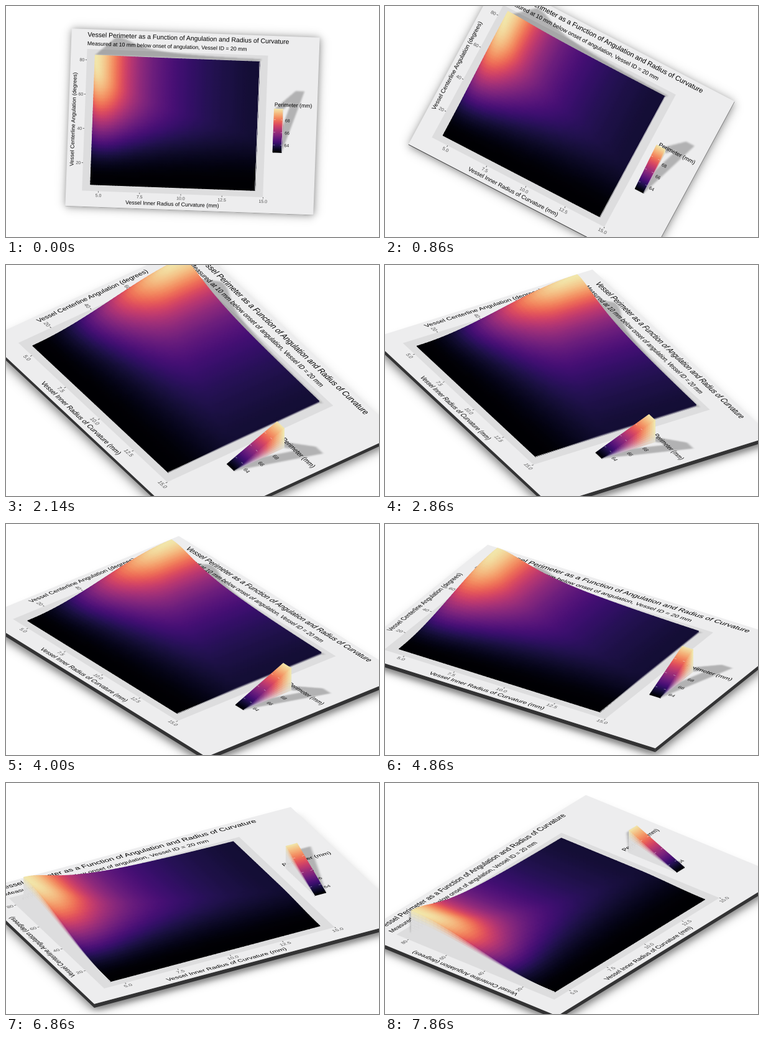
Recreate the animation shown at these times as a matplotlib script. Size 600 by 371 pixels, loop 8000 ms.

```python
import numpy as np
import matplotlib.pyplot as plt
from matplotlib.animation import FuncAnimation
from matplotlib.collections import LineCollection, PolyCollection
from matplotlib.colors import ListedColormap
from matplotlib.patches import PathPatch, Rectangle
from matplotlib.path import Path
from matplotlib.textpath import TextPath
from matplotlib.transforms import Affine2D

STAGE_W, STAGE_H = 600, 371
STEP_MS = 50
LOOP_MS = 8000
POSES_PER_SEC = 7

# Plate geometry, in pixels at the opening zoom
W, H = 399.3, 285.2
THICK = 5
FLOOR_Z = -10
MID_Z = 9
PEAK = 28.5
PANEL = (26, 32, 317.2, 259.8)
DATA = (39.2, 42.4, 304.2, 249.5)
BAR = (330.5, 118.3, 344.7, 187)
CAST = (33, -30)
PANEL_GREY = np.array([0.865, 0.865, 0.87])
PT = W / 7 / 72
CMAP = ListedColormap(0.96 * plt.get_cmap("magma")(np.linspace(0, 1, 256))[:, :3])

fig = plt.figure(figsize=(STAGE_W / 100, STAGE_H / 100), dpi=100, facecolor="white")
ax = fig.add_axes([0, 0, 1, 1])
ground = Affine2D()
floor = Affine2D()


# ---------- camera ----------
def sigmoid(x):
    return 1 / (1 + np.exp(-x))


def camera(pose):
    """Return the 2x3 projection matrix and theta for a pose."""
    n = 2 + pose * 30 / POSES_PER_SEC
    m = min(n, 359 - n)
    theta = np.radians(60 * np.sin(np.radians(n)))
    phi = np.radians(30 + 60 * sigmoid((7 - 27 * m / 179) / 2))
    zoom = 0.45 + 0.2 * sigmoid(5 - 25 * m / 179)
    s = 0.648 / zoom
    c, d = np.cos(theta), np.sin(theta)
    m3 = s * np.array([[c, -d, 0],
                       [d * np.sin(phi), c * np.sin(phi), -np.cos(phi)]])
    return m3, theta


def project(m3, u, v, z):
    u, v, z = np.broadcast_arrays(u, v, z)
    p = np.stack([u - W / 2, v - H / 2, z - MID_Z], axis=-1) @ m3.T
    return p + [STAGE_W / 2, STAGE_H / 2]


def plane_matrix(m3, z):
    off = project(m3, 0.0, 0.0, z)
    return np.array([[m3[0, 0], m3[0, 1], off[0]],
                     [m3[1, 0], m3[1, 1], off[1]],
                     [0, 0, 1]])


# ---------- data ----------
def perimeter(radius, angle):
    d = radius - 4.5
    width = 74 - 40 * np.sqrt(d / 10)
    t = np.clip((angle - 8) / width, 0, 1)
    rise = (t * t * (3 - 2 * t)) ** 1.1
    fall = (1 + (d / 1.75) ** 2) ** -0.65
    return rise * fall


def x_pos(radius):
    return DATA[0] + (radius - 4.5) * (DATA[2] - DATA[0]) / 10


def y_pos(angle):
    return DATA[3] - (angle - 7.5) * (DATA[3] - DATA[1]) / 75


def bar_pos(value):
    return BAR[3] - (value - 62.83) * 10


radius = 4.5 + 10 * np.linspace(0, 1, 52) ** 1.3
angle = np.linspace(82.5, 7.5, 40)
surf_h = perimeter(*np.meshgrid(radius, angle))
surf_u, surf_v = np.meshgrid(x_pos(radius), y_pos(angle))

bar_u, bar_v = np.meshgrid([BAR[0], BAR[2]], np.linspace(BAR[1], BAR[3], 30))
bar_h = (BAR[3] - bar_v) / (BAR[3] - BAR[1])


# ---------- things lying on the plate ----------
def on_plate():
    return ground + ax.transData


def rect(box, color, z):
    u0, v0, u1, v1 = box
    ax.add_patch(Rectangle((u0, v0), u1 - u0, v1 - v0, fc=color, lw=0,
                           transform=on_plate(), zorder=z))


def label(s, u, v, pt, color="black", align=0.0, turn=False):
    path = TextPath((0, 0), s, size=pt * PT, prop={"family": "Liberation Sans"})
    xy = path.vertices.copy()
    xy[:, 0] -= align * xy[:, 0].max()
    if turn:
        pts = np.column_stack([u - xy[:, 1], v - xy[:, 0]])
    else:
        pts = np.column_stack([u + xy[:, 0], v - xy[:, 1]])
    ax.add_patch(PathPatch(Path(pts, path.codes), fc=color, lw=0,
                           transform=on_plate(), zorder=5))


def blur(a, times=3, size=5):
    kernel = np.ones(size) / size
    for _ in range(times):
        for axis in (0, 1):
            a = np.apply_along_axis(np.convolve, axis, a, kernel, "same")
    return a


def shade(alpha, box, transform, z):
    u0, v0, u1, v1 = box
    rgba = np.zeros(alpha.shape + (4,))
    rgba[..., 3] = alpha
    ax.imshow(rgba, extent=(u0, u1, v1, v0), origin="upper", aspect="auto",
              interpolation="bilinear", transform=transform + ax.transData, zorder=z)


def cast_mask():
    nu, nv = 800, 572
    gu, gv = np.meshgrid((np.arange(nu) + 0.5) * W / nu, (np.arange(nv) + 0.5) * H / nv)
    grid = np.column_stack([gu.ravel(), gv.ravel()])
    top = np.column_stack([surf_u[0], surf_v[0]])
    tip = top + np.outer(surf_h[0], CAST)
    a, b, c, d = [np.array(p) for p in
                  ((BAR[0], BAR[1]), (BAR[2], BAR[1]), (BAR[2], BAR[3]), (BAR[0], BAR[3]))]
    shapes = [np.vstack([top, tip[::-1]]),
              np.array([d, a + CAST, b + CAST, c]),
              np.array([a, a + CAST, b + CAST, b])]
    mask = np.zeros(nu * nv, bool)
    for s in shapes:
        mask |= Path(s).contains_points(grid)
    return blur(mask.reshape(nv, nu).astype(float))


def floor_mask(pad=40, soft=4):
    u = np.arange(-pad, W + pad)
    v = np.arange(-pad, H + pad)
    fu = sigmoid(u / soft) * sigmoid((W - u) / soft)
    fv = sigmoid(v / soft) * sigmoid((H - v) / soft)
    return np.outer(fv, fu), (-pad, -pad, u[-1] + 1, v[-1] + 1)


def build_plate():
    alpha, box = floor_mask()
    shade(0.5 * alpha, box, floor, 1)
    rect((0, 0, W, H), "#ededee", 3)
    rect(PANEL, PANEL_GREY, 3.1)
    shade(0.25 * cast_mask(), (0, 0, W, H), ground, 4)

    label("Vessel Perimeter as a Function of Angulation and Radius of Curvature",
          PANEL[0], 12.1, 13.2)
    label("Measured at 10 mm below onset of angulation, Vessel ID = 20 mm",
          PANEL[0], 25.8, 11)
    mid_u, mid_v = (PANEL[0] + PANEL[2]) / 2, (PANEL[1] + PANEL[3]) / 2
    label("Vessel Inner Radius of Curvature (mm)", mid_u, 279, 11, align=0.5)
    label("Vessel Centerline Angulation (degrees)", 10.8, mid_v, 11, align=0.5, turn=True)
    label("Perimeter (mm)", BAR[0], 113.2, 11)

    grey = "#4d4d4d"
    for r in (5.0, 7.5, 10.0, 12.5, 15.0):
        u = x_pos(r)
        label(f"{r:.1f}", u, 268.9, 8.8, grey, 0.5)
        rect((u - 0.35, PANEL[3], u + 0.35, PANEL[3] + 2.2), "#333333", 5)
    for a in (20, 40, 60, 80):
        v = y_pos(a)
        label(str(a), 22, v + 2.5, 8.8, grey, 1)
        rect((PANEL[0] - 2.2, v - 0.35, PANEL[0], v + 0.35), "#333333", 5)
    for p in (64, 66, 68):
        label(str(p), 348.5, bar_pos(p) + 2.5, 8.8, "#1a1a1a")


# ---------- parts redrawn for each pose ----------
moving = []


def sides(m3, theta):
    """The front edge of the slab and the side edge that faces the viewer."""
    edge = 0 if theta < 0 else W
    quads = []
    for ends in ([(0, H), (W, H)], [(edge, 0), (edge, H)]):
        u, v = np.array(ends).T
        quads.append(np.vstack([project(m3, u, v, 0), project(m3, u, v, -THICK)[::-1]]))
    return ax.add_collection(PolyCollection(quads, fc="#333334", lw=0, zorder=2))


def wall(m3, u, v, h, fade, z):
    """Vertical face under one edge, going from the edge colour to grey."""
    levels = np.linspace(0, 1, 9)
    rows = [project(m3, u, v, h * PEAK * (1 - f)) for f in levels]
    tint = CMAP(h / 1.03)[:, :3]
    quads, colors = [], []
    for j in range(len(levels) - 1):
        w = fade((levels[j] + levels[j + 1]) / 2)
        for i in range(len(h) - 1):
            quads.append([rows[j][i], rows[j][i + 1], rows[j + 1][i + 1], rows[j + 1][i]])
            colors.append(tint[i] * (1 - w) + PANEL_GREY * w)
    return ax.add_collection(PolyCollection(quads, fc=colors, ec=colors, lw=0.3, zorder=z))


def relief(m3, theta, u, v, h, z):
    p = project(m3, u, v, h * PEAK)
    parts = [ax.pcolormesh(p[..., 0], p[..., 1], h, cmap=CMAP, vmin=0, vmax=1.03,
                           shading="gouraud", zorder=z)]
    if theta < 0:
        side, fade = 0, lambda f: min(1, 0.2 + 2 * f)
    else:
        side, fade = -1, lambda f: 0.85 * f ** 2
    parts.append(wall(m3, u[:, side], v[:, side], h[:, side], fade, z + 1))
    return parts


def bar_ticks(m3):
    lines = []
    for p in (64, 66, 68):
        v = bar_pos(p)
        z = PEAK * (BAR[3] - v) / (BAR[3] - BAR[1])
        for u in (BAR[0], BAR[2] - 2.8):
            lines.append(project(m3, np.array([u, u + 2.8]), v, z))
    return ax.add_collection(LineCollection(lines, colors="white", lw=0.45,
                                            alpha=0.6, zorder=10))


def draw(i):
    pose = int((i * STEP_MS + STEP_MS - 1) * POSES_PER_SEC / 1000)
    while moving:
        moving.pop().remove()
    m3, theta = camera(pose)
    ground.set_matrix(plane_matrix(m3, 0))
    floor.set_matrix(plane_matrix(m3, FLOOR_Z))
    moving.append(sides(m3, theta))
    moving.extend(relief(m3, theta, surf_u, surf_v, surf_h, 6))
    moving.extend(relief(m3, theta, bar_u, bar_v, bar_h, 8))
    moving.append(bar_ticks(m3))
    ax.set_xlim(0, STAGE_W)
    ax.set_ylim(STAGE_H, 0)
    return moving


build_plate()
ax.axis("off")
anim = FuncAnimation(fig, draw, frames=LOOP_MS // STEP_MS, interval=STEP_MS,
                     init_func=lambda: draw(0), repeat=True, repeat_delay=0, blit=False)
plt.show()
```
